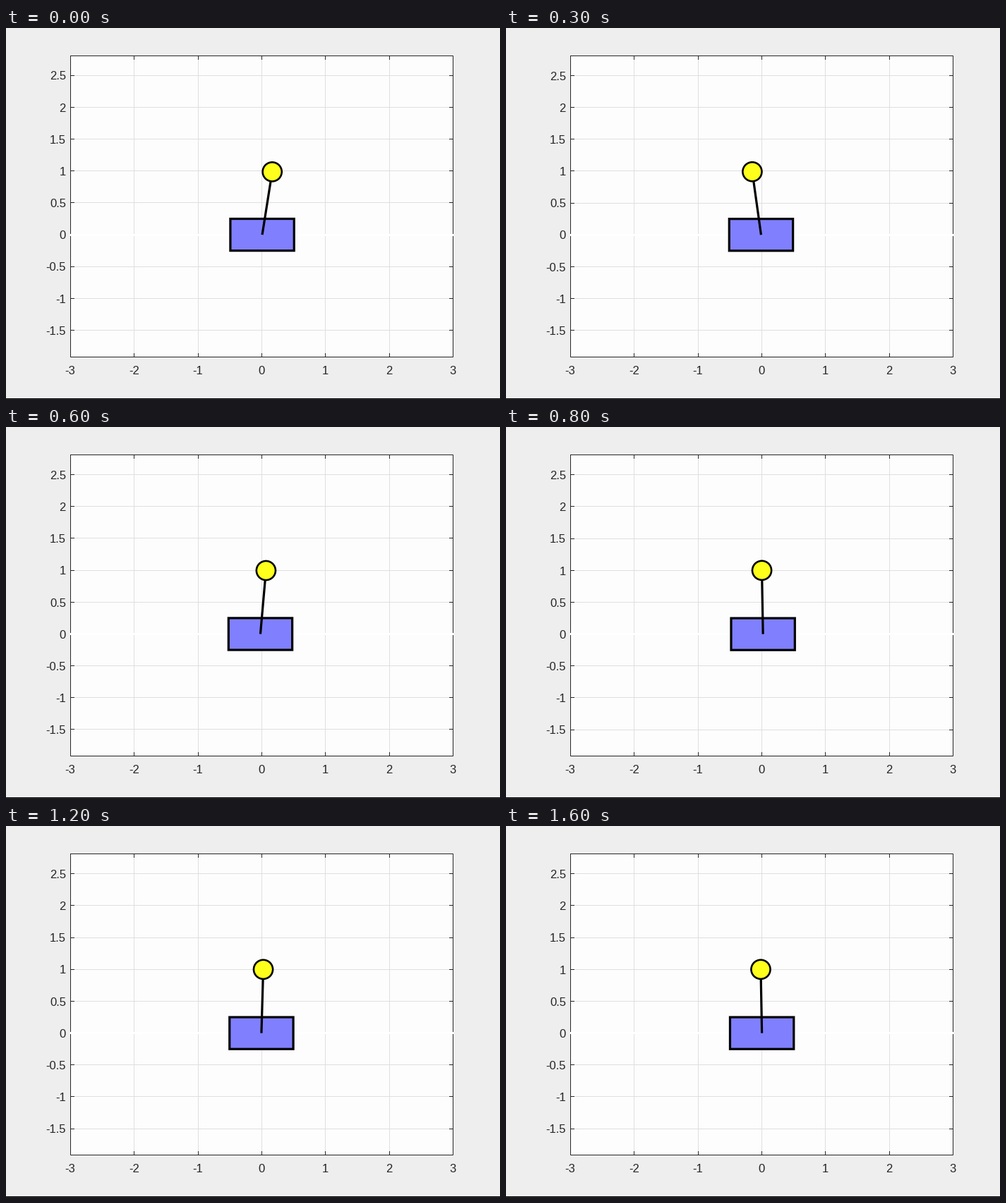
A matplotlib script that plays this animation: 700 px wide and 526 px high, repeating every 1.7 s.

```python
import numpy as np
import matplotlib.pyplot as plt
from matplotlib.animation import FuncAnimation
from matplotlib.patches import Circle, Rectangle

plt.rcParams["path.snap"] = False

W, H, DPI = 700, 526, 100
FRAMES, INTERVAL = 17, 100
LEFT, RIGHT, TOP, BOTTOM = 91.5, 633.5, 39.5, 466.5
UNIT = (RIGHT - LEFT) / 6
MID_X, MID_Y = (LEFT + RIGHT) / 2, (TOP + BOTTOM) / 2
INK, GRID, PAPER = "#262626", "#dfdfdf", "#fdfdfd"
TICK = 5.5
Y_VALUES = np.arange(-1.5, 2.6, 0.5)

fig = plt.figure(figsize=(W / DPI, H / DPI), dpi=DPI, facecolor="#eeeeee")
ax = fig.add_axes([0, 0, 1, 1])
ax.set_xlim(0, W)
ax.set_ylim(H, 0)
ax.axis("off")


def px(width):
    return width * 72 / DPI


def pixel_centre(pos):
    return np.floor(pos) + 0.5


def line(xs, ys, color=INK, width=1, z=3, cap="butt"):
    art, = ax.plot(xs, ys, color=color, lw=px(width), zorder=z,
                   solid_capstyle=cap, solid_joinstyle="miter")
    return art


def label(x, y, value, align):
    return ax.text(x, y, f"{value:g}", ha=align, va="baseline", color=INK,
                   family="Liberation Sans", fontsize=px(16.67))


def cart_position(t):
    return (0.0066 + 0.0284 * t) * np.exp(-0.27 * t) * np.sin(0.72 * (2.6 - t))


def pole_angle(t):
    swing = 0.226 * np.exp(-0.157 * t) * np.sin(0.965 * (1.2 - t))
    return swing - 0.05 * np.exp(-3 * t)


# Static plot area
ax.add_patch(Rectangle((LEFT, TOP), RIGHT - LEFT, BOTTOM - TOP, fc=PAPER, lw=0, zorder=0))
ax.add_patch(Rectangle((0, H - 1), W, 1, fc="black", lw=0, zorder=0))
line([LEFT, RIGHT, RIGHT, LEFT, LEFT], [TOP, TOP, BOTTOM, BOTTOM, TOP], cap="projecting")
for value in range(-3, 4):
    pos = MID_X + value * UNIT
    x = pixel_centre(pos)
    if abs(value) < 3:
        line([x, x], [TOP, BOTTOM], GRID, z=1)
        line([x, x], [TOP, TOP + TICK])
        line([x, x], [BOTTOM, BOTTOM - TICK])
    label(pos - 0.4, 491, value, "center")

# Rows shift slightly as the view stays centred on the mechanism
rows = []
for value in Y_VALUES:
    marks = [line([LEFT, RIGHT], [0, 0], GRID, z=1)]
    marks += [line([LEFT, LEFT + TICK], [0, 0]), line([RIGHT - TICK, RIGHT], [0, 0])]
    rows.append((value, marks, label(85, 0, value, "right")))
baseline = line([LEFT - 1, RIGHT + 1], [0, 0], "white", 3, z=4)

cart = ax.add_patch(Rectangle((0, 0), UNIT, UNIT / 2, fc="#8080ff", ec="black",
                              lw=px(3.2), zorder=5, joinstyle="miter"))
rod = line([0, 0], [0, 0], "black", 3.2, z=6)
bob = ax.add_patch(Circle((0, 0), 0.15 * UNIT, fc="#ffff1c", ec="black",
                          lw=px(2.6), zorder=7))


def update(frame):
    angle = pole_angle(frame)
    x = MID_X + cart_position(frame) * UNIT
    y = MID_Y + (np.cos(angle) - 0.1) / 2 * UNIT
    tip = x + np.sin(angle) * UNIT, y - np.cos(angle) * UNIT

    for value, marks, text in rows:
        level = y - value * UNIT
        for mark in marks:
            mark.set_ydata([pixel_centre(level)] * 2)
        text.set_y(np.round(level + 6.2))
    baseline.set_ydata([pixel_centre(y)] * 2)

    cart.set_xy((x - UNIT / 2, y - UNIT / 4))
    rod.set_data([x, tip[0]], [y, tip[1]])
    bob.center = tip
    return cart, rod, bob


anim = FuncAnimation(fig, update, frames=FRAMES, interval=INTERVAL,
                     repeat=True, repeat_delay=0, blit=False)
plt.show()
```
